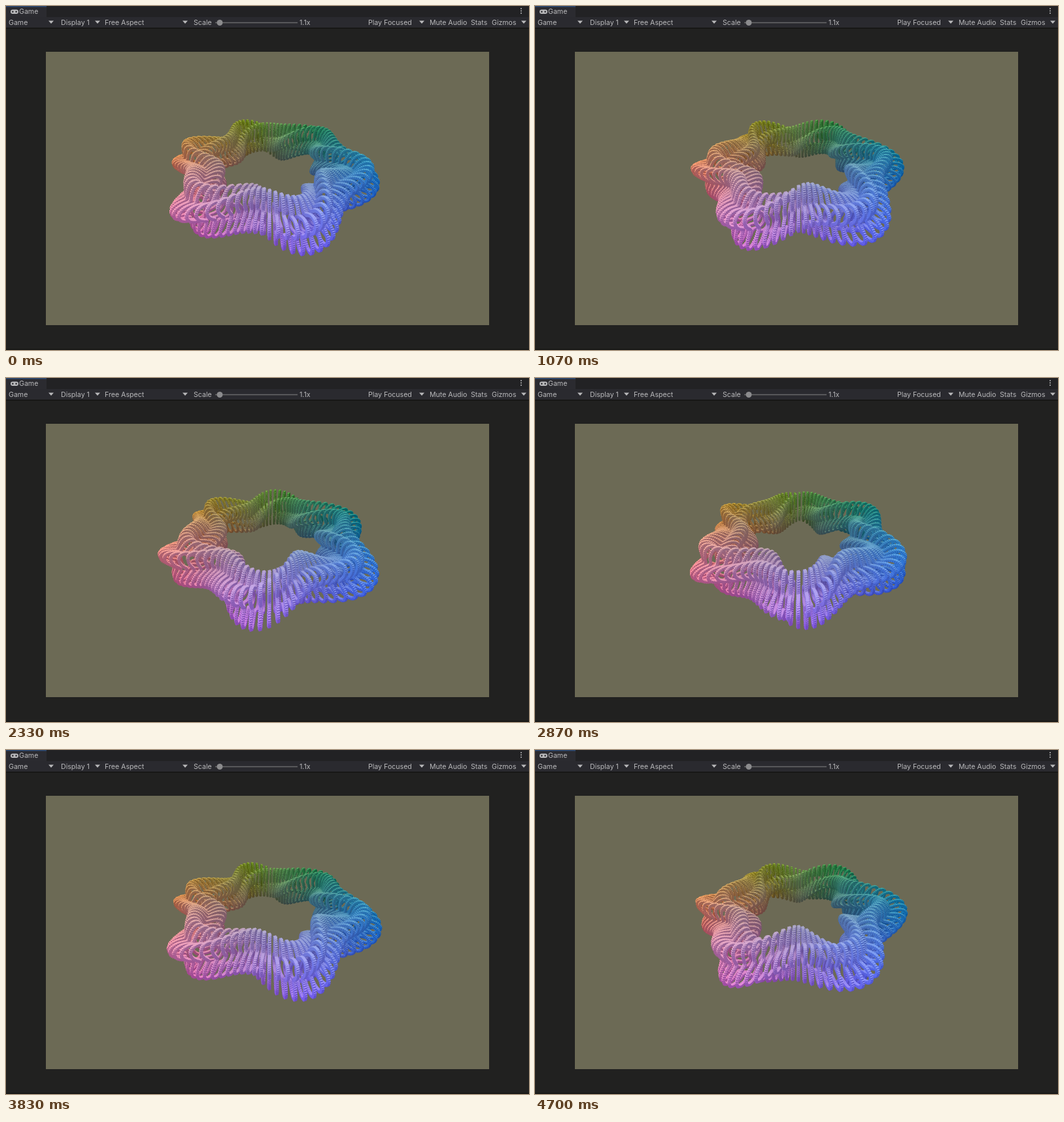
These frames come from a looping animation (800 by 526 pixels, 4.73 s). An HTML page with a canvas:

```html
<!DOCTYPE html>
<html lang="en">
<head>
<meta charset="utf-8">
<title>Twisting torus</title>
<style>
html, body { margin: 0; width: 100%; height: 100%; overflow: hidden; background: #212120; }
svg, canvas { position: absolute; display: block; }
svg { left: 0; top: 0; }
canvas { left: 230px; top: 155px; width: 360px; height: 250px; }
text { font: 10.6px Inter, "Liberation Sans", sans-serif; fill: #b9b9bb; }
</style>
</head>
<body>
<svg width="800" height="526" viewBox="0 0 800 526">
  <rect width="800" height="17" fill="#222224"/>
  <rect width="62" height="17" fill="#2b2b30"/>
  <rect width="62" height="1.5" fill="#2c4a74"/>
  <rect y="17" width="800" height="16" fill="#2a2a2f"/>
  <rect y="33" width="800" height="2" fill="#171716"/>
  <rect y="524" width="800" height="2" fill="#191917"/>
  <rect x="61" y="70" width="678" height="418" fill="#6c6a55"/>
  <rect x="7" y="5.5" width="12" height="6.5" rx="3.2" fill="#b9b9bb"/>
  <circle cx="10.3" cy="8.7" r="1.3" fill="#2b2b30"/>
  <circle cx="15.6" cy="8.7" r="1.3" fill="#2b2b30"/>
  <text x="20" y="12">Game</text>
  <g fill="#b9b9bb">
    <circle cx="788" cy="4" r="1"/><circle cx="788" cy="7.5" r="1"/><circle cx="788" cy="11" r="1"/>
    <path d="M65 22.5h8l-4 4.5zM136 22.5h8l-4 4.5zM270 22.5h8l-4 4.5zM632 22.5h8l-4 4.5zM788 22.5h8l-4 4.5z"/>
  </g>
  <text x="4" y="29">Game</text>
  <text x="84" y="29">Display 1</text>
  <text x="151" y="29">Free Aspect</text>
  <text x="287" y="29">Scale</text>
  <path d="M320 25.5H446" stroke="#67676a" stroke-width="1.5"/>
  <circle cx="327" cy="25.5" r="4.5" fill="#8b8b8d"/>
  <text x="449" y="29">1.1x</text>
  <text x="554" y="29">Play Focused</text>
  <text x="648" y="29">Mute Audio</text>
  <text x="711" y="29">Stats</text>
  <text x="743" y="29">Gizmos</text>
</svg>
<canvas id="view" width="720" height="500"></canvas>
<script>
const LOOP = 4730, N = 100, SIZE = 0.021;
const SS = 2, W = 720, H = 500;

// Camera with a 60 degree field of view; OFF is the torus centre in view space
const CX = (400 - 230) * SS, CY = (278.5 - 155) * SS, FOCAL = 361 * SS;
const OFF = [0.025, 0.192], DIST = 2.28;
const YAW = Math.PI / 8, PITCH = 0.627;
const SY = Math.sin(YAW), CYAW = Math.cos(YAW);
const SP = Math.sin(PITCH), CP = Math.cos(PITCH);
const CAM_X = SY * (DIST * CP + OFF[1] * SP);

// World axes x, y, z in view space: right, up, towards the viewer
const AXES = [[-CYAW, -SP * SY, CP * SY], [0, CP, SP], [SY, -SP * CYAW, CP * CYAW]];
const [AX, AY, AZ] = AXES;

const ctx = document.getElementById('view').getContext('2d');
const image = ctx.createImageData(W, H);
const pixels = new Uint32Array(image.data.buffer);
const zbuf = new Float32Array(W * H);

const COUNT = N * N;
const pos = new Float32Array(COUNT * 3);
const lightU = new Int16Array(COUNT), lightV = new Int16Array(COUNT);
const lightD = new Float32Array(COUNT);
const GRID = 130, CELL = 0.02;
const shadow = new Float32Array(GRID * GRID);

function placePoints(t) {
  shadow.fill(-9);
  let n = 0;
  for (let i = 0; i < N; i++) {
    const a = ((i + 0.5) / N * 2 - 1) * Math.PI;
    const r1 = 0.7 + 0.1 * Math.sin(6 * a + Math.PI * 0.5 * t);
    const sa = Math.sin(a), ca = Math.cos(a);
    for (let j = 0; j < N; j++, n++) {
      const b = ((j + 0.5) / N * 2 - 1) * Math.PI;
      const r2 = 0.15 + 0.05 * Math.sin(8 * a + 4 * b + Math.PI * 2 * t);
      const s = r1 + r2 * Math.cos(b);
      const x = s * sa, y = r2 * Math.sin(b), z = s * ca;
      pos[n * 3] = x; pos[n * 3 + 1] = y; pos[n * 3 + 2] = z;
      const u = lightU[n] = (0.866 * x + 0.5 * z + 1.3) / CELL;
      const v = lightV[n] = (0.383 * x - 0.643 * y - 0.663 * z + 1.3) / CELL;
      const d = lightD[n] = 0.321 * x + 0.766 * y - 0.557 * z;
      const k = v * GRID + u;
      if (d > shadow[k]) shadow[k] = d;
    }
  }
}

const clamp = v => v < 0 ? 0 : v > 1 ? 255 : v * 255;
const pack = (r, g, b) => (255 << 24 | clamp(b) << 16 | clamp(g) << 8 | clamp(r)) >>> 0;

// Fills a parallelogram with centre (x, y), edges p and q as [dx, dy, dz]
function fillFace(x, y, z, p, q, color) {
  const det = p[0] * q[1] - p[1] * q[0];
  if (Math.abs(det) < 0.05) return;
  const hx = (Math.abs(p[0]) + Math.abs(q[0])) / 2, hy = (Math.abs(p[1]) + Math.abs(q[1])) / 2;
  const x0 = Math.max(0, Math.ceil(x - hx - 0.5)), x1 = Math.min(W - 1, Math.floor(x + hx - 0.5));
  const y0 = Math.max(0, Math.ceil(y - hy - 0.5)), y1 = Math.min(H - 1, Math.floor(y + hy - 0.5));
  for (let py = y0; py <= y1; py++) {
    const dy = py + 0.5 - y;
    for (let px = x0; px <= x1; px++) {
      const dx = px + 0.5 - x;
      const a = (dx * q[1] - dy * q[0]) / det, b = (dy * p[0] - dx * p[1]) / det;
      if (a > 0.5 || a < -0.5 || b > 0.5 || b < -0.5) continue;
      const depth = z + a * p[2] + b * q[2], k = py * W + px;
      if (depth < zbuf[k]) { zbuf[k] = depth; pixels[k] = color; }
    }
  }
}

const edges = [[0, 0, 0], [0, 0, 0], [0, 0, 0]];

function drawCube(n) {
  const x = pos[n * 3], y = pos[n * 3 + 1], z = pos[n * 3 + 2];
  const along = i => x * AX[i] + y * AY[i] + z * AZ[i];
  const vx = OFF[0] + along(0), vy = OFF[1] + along(1), depth = DIST - along(2);
  const k = FOCAL / depth, sx = CX + k * vx, sy = CY - k * vy;
  AXES.forEach((axis, i) => {
    const e = edges[i];
    e[0] = k * SIZE * (axis[0] + vx / depth * axis[2]);
    e[1] = -k * SIZE * (axis[1] + vy / depth * axis[2]);
    e[2] = -SIZE * axis[2];
  });
  const [ex, ey, ez] = edges;
  const r = 0.5 + 0.5 * x, g = 0.5 + 0.5 * y, b = 0.5 + 0.5 * z;
  const lit = shadow[lightV[n] * GRID + lightU[n]] - lightD[n] < 0.07;

  const top = lit ? 0.86 : 0.62, gloss = lit ? 0.15 : 0.03;
  fillFace(sx + ey[0] / 2, sy + ey[1] / 2, depth + ey[2] / 2, ex, ez,
    pack(r * top + gloss, g * top + gloss, b * top + gloss));
  fillFace(sx + ez[0] / 2, sy + ez[1] / 2, depth + ez[2] / 2, ex, ey,
    pack(r * 0.7, g * 0.68, b * 0.8 + 0.02));
  const facing = x < CAM_X, side = facing ? 0.5 : -0.5;
  const flank = lit && facing ? 0.82 : 0.6;
  fillFace(sx + ex[0] * side, sy + ex[1] * side, depth + ex[2] * side, ey, ez,
    pack(r * flank, g * flank, b * (flank + 0.1) + 0.02));
}

function frame(now) {
  placePoints(now % LOOP / 1000 - 3.37);
  pixels.fill(0);
  zbuf.fill(99);
  for (let n = 0; n < COUNT; n++) drawCube(n);
  ctx.putImageData(image, 0, 0);
  requestAnimationFrame(frame);
}
requestAnimationFrame(frame);
</script>
</body>
</html>
```
